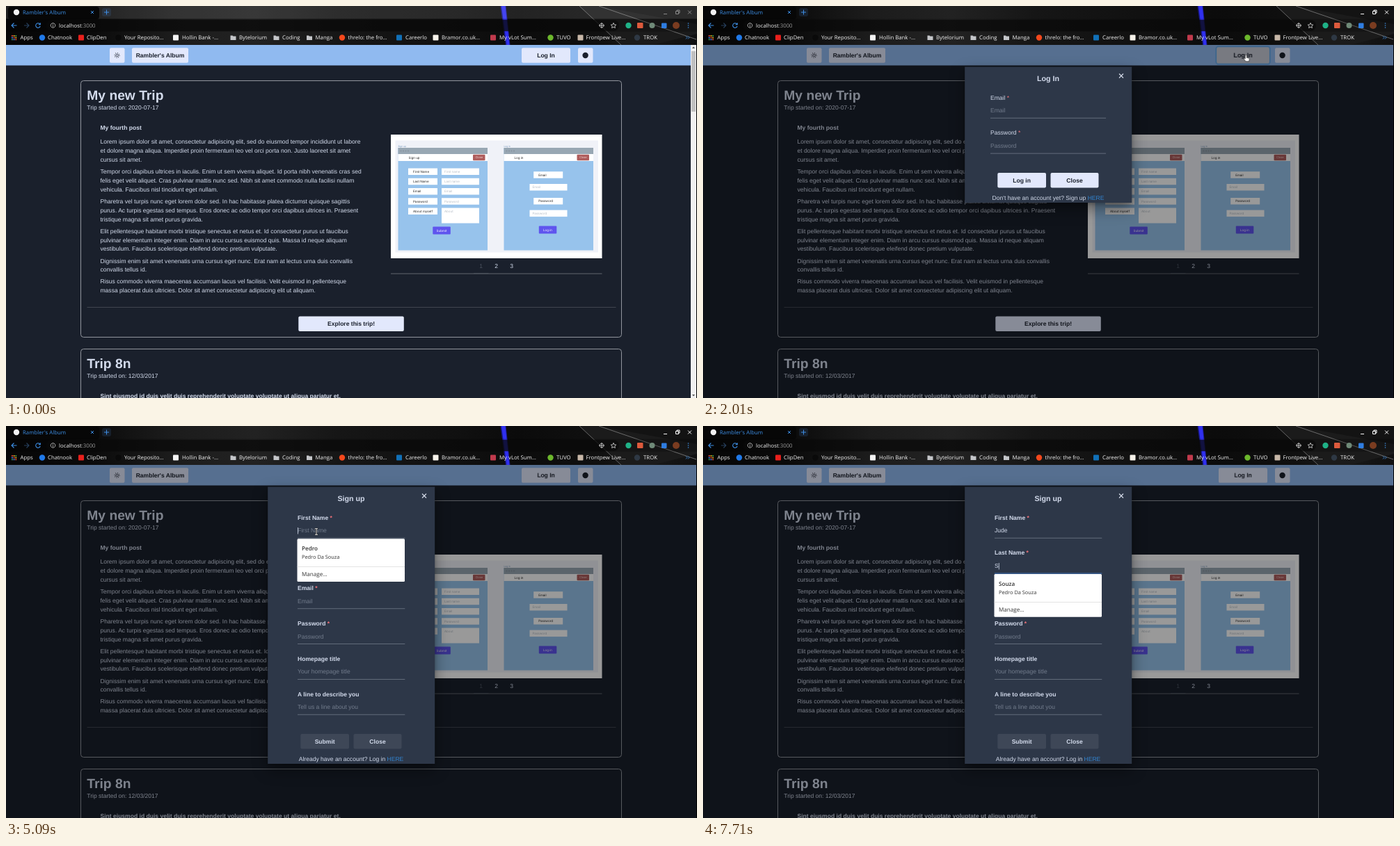
Animation of 993 by 564 pixels, one loop 8000 ms. Source, as an HTML page:

```html
<!DOCTYPE html>
<html lang="en">
<head>
<meta charset="utf-8">
<title>Rambler's Album</title>
<style>
html, body { margin: 0; width: 100%; height: 100%; overflow: hidden; background: #000; }
svg { display: block; width: 993px; height: 564px; }
text { font: 8.56px "Liberation Sans", Arial, sans-serif; fill: #d3dbec; text-rendering: geometricPrecision; white-space: pre; }
.b { font-weight: 700; }
.h1 { font-size: 19.26px; font-weight: 700; }
.h2 { font-size: 10.7px; font-weight: 700; }
.dark { font-weight: 700; fill: #1a202c; }
.mid { text-anchor: middle; }
.hint { fill: #727c8c; }
.red { fill: #f07178; }
.link { fill: #3182ce; }
.off { fill: #4c5361; }
.ui { font: 7.8px "Open Sans", "Noto Sans", sans-serif; fill: #f2f2f2; }
.tab { fill: #3d8fe6; }
.mock { font: 4.5px Inter, sans-serif; fill: #222; }
.pale { fill: #b4bcc6; }
.tiny { font-size: 3.2px; fill: #6b8fb5; }
.shut { font-size: 4px; fill: #f0d4d0; }
.white { fill: #fff; }
.pop { font: 8.1px "Open Sans", "Noto Sans", sans-serif; fill: #333; }
.popb { font-weight: 600; }
.small { font-size: 7.4px; }
.panel { filter: drop-shadow(0 2.7px 2.7px rgba(0,0,0,.2)) drop-shadow(0 8px 10.7px rgba(0,0,0,.4)); }

/* one loop is 8 s: 1% = 80 ms */
.a { animation: 8s step-end infinite; }
#idle { animation-name: idle; }
#awake { animation-name: awake; }
#vbar { animation-name: vbar; }
#hbar { animation-name: hbar; }
#shade { animation-name: shade; }
#login { animation-name: login; }
#signup { animation-name: signup; }
#xring { animation-name: xring; }
#btn { animation: btn 8s ease infinite; transform-origin: 776px 71px; }
#btnface { animation: face 8s linear infinite; }
#btnring { animation: ring 8s linear infinite; }
#line0 { animation: line0 8s linear infinite; }
#line1 { animation: line1 8s linear infinite; }
#hint0 { animation-name: hint0; }
#hint1 { animation-name: hint1; }
#k1 { animation-name: key1; }
#k2 { animation-name: key2; }
#k3 { animation-name: key3; }
#k4 { animation-name: key4; }
#s1, #pop1 { animation-name: last; }
#pop0 { animation-name: pop0; transform-origin: 496px 193px; }
#caret { animation-name: caret; }
#cursor { animation: path 8s linear infinite; }
#arrow { animation-name: arrow; }
#hand { animation-name: hand; }
#beam { animation-name: beam; }

@keyframes idle { 0% { opacity: 1 } 22.7%, 100% { opacity: 0 } }
@keyframes awake { 0% { opacity: .45 } 22.7%, 100% { opacity: 1 } }
@keyframes vbar { 0% { opacity: 1 } 25.1%, 100% { opacity: 0 } }
@keyframes hbar { 0% { opacity: 0 } 14.7% { opacity: 1 } 25.1%, 100% { opacity: 0 } }
@keyframes shade { 0% { opacity: 0 } 25.1%, 100% { opacity: 1 } }
@keyframes login { 0% { opacity: 0 } 25.1% { opacity: 1 } 43.3%, 100% { opacity: 0 } }
@keyframes signup { 0% { opacity: 0 } 43.3%, 100% { opacity: 1 } }
@keyframes xring { 0% { opacity: 0 } 26.2% { opacity: 1 } 41%, 100% { opacity: 0 } }
@keyframes btn { 0%, 13.6% { transform: scale(1) } 16.5%, 24.5% { transform: scale(1.1) } 28.5%, 100% { transform: scale(1) } }
@keyframes face { 0%, 13.6% { fill: #e2e8fc } 16.5%, 25.2% { fill: #c9ccd8 } 28.5%, 100% { fill: #e2e8fc } }
@keyframes ring { 0%, 22.6% { opacity: 0 } 23.5%, 25.2% { opacity: 1 } 28.5%, 100% { opacity: 0 } }
@keyframes line0 { 0%, 63.6% { fill: #707988 } 66.2%, 89.3% { fill: #4299e1 } 90.5%, 100% { fill: #707988 } }
@keyframes line1 { 0%, 89.3% { fill: #707988 } 91.5%, 100% { fill: #4280d8 } }
@keyframes hint0 { 0% { opacity: 1 } 78.4%, 100% { opacity: 0 } }
@keyframes hint1 { 0% { opacity: 1 } 96.3%, 100% { opacity: 0 } }
@keyframes last { 0% { opacity: 0 } 96.3%, 100% { opacity: 1 } }
@keyframes key1 { 0% { fill-opacity: 0 } 78.4%, 100% { fill-opacity: 1 } }
@keyframes key2 { 0% { fill-opacity: 0 } 80.8%, 100% { fill-opacity: 1 } }
@keyframes key3 { 0% { fill-opacity: 0 } 83.2%, 100% { fill-opacity: 1 } }
@keyframes key4 { 0% { fill-opacity: 0 } 85.3%, 100% { fill-opacity: 1 } }
@keyframes pop0 {
  0% { opacity: 0; transform: none }
  63.6% { opacity: 1; transform: none }
  78.4% { opacity: .75; transform: scale(.988) }
  79.6%, 100% { opacity: 0; transform: none }
}
@keyframes caret {
  0% { opacity: 0; transform: none }
  62.4% { opacity: 1; transform: none }
  71.1% { opacity: 0; transform: none }
  78.4% { opacity: 1; transform: translate(4.4px, 0) }
  80.8% { opacity: 1; transform: translate(9.2px, 0) }
  83.2% { opacity: 1; transform: translate(14px, 0) }
  85.3% { opacity: 1; transform: translate(18.8px, 0) }
  89.3% { opacity: 1; transform: translate(0, 51px) }
  96.3%, 100% { opacity: 1; transform: translate(5.8px, 51px) }
}
@keyframes path {
  0%, 2.8% { transform: translate(1010px, 325px) }
  2.9% { transform: translate(988px, 306px) }
  5.25% { transform: translate(948px, 208px) }
  7.6% { transform: translate(868px, 108px) }
  10% { transform: translate(799px, 58px) }
  12.4% { transform: translate(779.5px, 43px) }
  13.6% { transform: translate(780px, 58px) }
  16.2%, 26.2% { transform: translate(780.5px, 71px); animation-timing-function: ease-in-out }
  33.7% { transform: translate(578px, 267.5px) }
  35% { transform: translate(576px, 270px) }
  38.5%, 44.6% { transform: translate(571px, 279px) }
  52.7% { transform: translate(548px, 297px); animation-timing-function: ease-in-out }
  61.2%, 100% { transform: translate(446px, 152px) }
}
@keyframes arrow { 0% { opacity: 1 } 13.9% { opacity: 0 } 26.6% { opacity: 1 } 36% { opacity: 0 } 44.6% { opacity: 1 } 59.5%, 100% { opacity: 0 } }
@keyframes hand { 0% { opacity: 0 } 13.9% { opacity: 1 } 26.6% { opacity: 0 } 36% { opacity: 1 } 44.6%, 100% { opacity: 0 } }
@keyframes beam { 0% { opacity: 0 } 59.5% { opacity: 1 } 80.8%, 100% { opacity: 0 } }
</style>
</head>
<body>
<svg id="stage" viewBox="0 0 993 564" xmlns="http://www.w3.org/2000/svg"></svg>
<script>
const text = (x, y, s, cls = "", id = "") =>
  `<text x="${x}" y="${y}" class="${cls}"${id && ` id="${id}"`}>${s}</text>`;
const rect = (x, y, w, h, fill, more = "") =>
  `<rect x="${x}" y="${y}" width="${w}" height="${h}" fill="${fill}" ${more}/>`;
const dot = (x, y, r, fill) => `<circle cx="${x}" cy="${y}" r="${r}" fill="${fill}"/>`;
const path = (d, stroke, w = 1, fill = "none") =>
  `<path d="${d}" stroke="${stroke}" stroke-width="${w}" fill="${fill}"/>`;
const shape = (d, fill) => path(d, "none", 0, fill);
const group = (id, body, cls = "a") => `<g id="${id}" class="${cls}">${body}</g>`;

const PALE = "#e2e8fc", INK = "#1a202c", BLUE = "#3d8fe6";

// ---- browser frame ----
// kind: c = circle, s = square, f = folder
const marks = [
  [52, "c", "#2079e8", 60, "Chatnook"], [108, "s", "#e8201c", 116, "ClipDen"],
  [161.5, "c", "#0a0a0a", 170, "Your Reposito…"], [244, "s", "#f4f4f4", 253, "Hollin Bank -…"],
  [326.5, "f", "", 335, "Bytelorium"], [388.5, "f", "", 397, "Coding"], [436, "f", "", 444.5, "Manga"],
  [483, "c", "#f4481c", 491.5, "threlo: the fro…"], [565, "s", "#1170b8", 574, "Careerlo"],
  [617.5, "s", "#f6f2ea", 626, "Bramor.co.uk…"], [700, "s", "#c03a4c", 709, "My vLot Sum…"],
  [782.5, "c", "#6cb82c", 791, "TUVO"], [825.5, "s", "#c8b8a8", 833.5, "Frontpew Live…"],
  [907, "c", "#2e3844", 916, "TROK"]
];
const icon = (x, kind, fill) =>
  kind === "c" ? dot(x, 45.5, 4.2, fill) :
  kind === "s" ? rect(x - 4, 41.5, 8, 8, fill, 'rx="1"') :
  shape(`M${x - 4} 42.4h3l1 1.1h4v5.6h-8z`, "#c4c6c9");

function frame() {
  let s = `<defs><linearGradient id="metal">` +
    [[0, "#060606"], [.12, "#0a0a0a"], [.24, "#1c1c1c"], [.36, "#222"], [.48, "#161616"], [.66, "#101010"],
     [.74, "#0b0b0b"], [.86, "#101010"], [.92, "#1a1a1a"], [1, "#101010"]]
      .map(([o, c]) => `<stop offset="${o}" stop-color="${c}"/>`).join("") +
    `</linearGradient></defs>` + rect(0, 0, 993, 56, "url(#metal)") +
    shape("M824 0H993V40L930 56H885z", "#1b1b1b") + shape("M850 0H993V26z", "#131313") +
    path("M824 0L884 56M852 0L992 48", "#8d8d8d", .7) +
    shape("M710.500 0H718.500L724.500 56H718z", "#1a1a8c") + shape("M712 0H717.500L723.500 56H719.500z", "#3030f0");
  s += group("idle", rect(0, 0, 993, 18.5, "#fff", 'opacity=".1"'));
  s += rect(3, 1, 131, 18, "#070707", 'rx="4"') + rect(0, 18.5, 993, 18.5, "#000", 'opacity=".2"') +
    rect(58, 20, 823, 16, "#0a0a0a", 'rx="8" opacity=".7"');
  s += dot(15, 9, 4.2, "#f2f2f2") + text(24, 12, "Rambler's Album", "ui tab");
  s += path("M122 7l4 4M126 7l-4 4M144.500 5.500v7M141 9h7", BLUE) + rect(138, 3, 13, 12, "#4b8de0", 'rx="3" opacity=".14"');
  s += group("awake", path("M945 11.500h5M962.500 7.500h4v4h-4zM964 7.500v-1.500h4v4h-1.500M980 6.500l5 5M985 6.500l-5 5", "#fff"));
  s += path("M15.500 28h-7M11.500 24.500L8 28l3.500 3.500", BLUE, 1.1) +
    path("M26 28h7M29.500 24.500L33 28l-3.500 3.500", "#27405e", 1.1) +
    path("M48.600 26a3.300 3.300 0 1 0 .6 3M49.300 24.300v2.500h-2.500", BLUE, 1.1);
  s += path("M67.500 24.600a3.300 3.300 0 1 0 .01 0M67.500 27.500v2.300M67.500 25.900v.9", "#d8d8d8", .8) +
    text(76, 30.8, 'localhost<tspan fill="#9a9a9a">:3000</tspan>', "ui");
  s += path("M856 25a3 3 0 1 0 .01 0M852 28h8M856 24v8", "#ddd", .8) +
    path("M873 24.300l1.100 2.500 2.700.3-2 1.800.6 2.700-2.400-1.400-2.400 1.400.6-2.700-2-1.800 2.700-.3z", "#ddd", .8);
  s += dot(894.5, 28, 4.2, "#1fb287") + rect(907, 24, 8.5, 8, "#dc5a3c", 'rx="1"') + dot(928.5, 28, 4, "#6f8a78") +
    rect(942, 24.5, 7.5, 7.5, "#2f7de0", 'rx="1"') + dot(963, 28, 5, "#7a3c20");
  s += [25, 28, 31].map(y => dot(980.5, y, .8, BLUE)).join("");
  for (let i = 0; i < 9; i++)
    s += rect(8 + i % 3 * 2.7, 42 + (i / 3 | 0) * 2.7, 1.8, 1.8, ["#ea4b3c", "#f2b51d", "#3c9e58", "#4285f4"][i % 4]);
  s += text(20.5, 48.2, "Apps", "ui");
  for (const [x, kind, fill, tx, label] of marks) s += icon(x, kind, fill) + text(tx, 48.2, label, "ui");
  return s + path("M977 43.500l2 2-2 2M980 43.500l2 2-2 2", BLUE, .9);
}

// ---- page ----
const paras = [
  ["Lorem ipsum dolor sit amet, consectetur adipiscing elit, sed do eiusmod tempor incididunt ut labore",
   "et dolore magna aliqua. Imperdiet proin fermentum leo vel orci porta non. Justo laoreet sit amet", "cursus sit amet."],
  ["Tempor orci dapibus ultrices in iaculis. Enim ut sem viverra aliquet. Id porta nibh venenatis cras sed",
   "felis eget velit aliquet. Cras pulvinar mattis nunc sed. Nibh sit amet commodo nulla facilisi nullam",
   "vehicula. Faucibus nisl tincidunt eget nullam."],
  ["Pharetra vel turpis nunc eget lorem dolor sed. In hac habitasse platea dictumst quisque sagittis",
   "purus. Ac turpis egestas sed tempus. Eros donec ac odio tempor orci dapibus ultrices in. Praesent",
   "tristique magna sit amet purus gravida."],
  ["Elit pellentesque habitant morbi tristique senectus et netus et. Id consectetur purus ut faucibus",
   "pulvinar elementum integer enim. Diam in arcu cursus euismod quis. Massa id neque aliquam",
   "vestibulum. Faucibus scelerisque eleifend donec pretium vulputate."],
  ["Dignissim enim sit amet venenatis urna cursus eget nunc. Erat nam at lectus urna duis convallis", "convallis tellus id."],
  ["Risus commodo viverra maecenas accumsan lacus vel facilisis. Velit euismod in pellentesque",
   "massa placerat duis ultricies. Dolor sit amet consectetur adipiscing elit ut aliquam."]
];

const card = (y, h, title, date) =>
  rect(107.5, y, 777, h, "none", 'rx="4" stroke="#92969e"') +
  text(116.3, y + 27, title, "h1") + text(116.3, y + 41.5, "Trip started on: " + date);

const win = (x, title, shut) =>
  text(x, 203, title, "mock tiny") +
  rect(x, 204, 128.5, 147.5, "#97c3ec") + rect(x, 204, 128.5, 9, "#98a7b3") + rect(x, 213, 128.5, 10, "#fff") +
  [4, 7.5, 11, 14.5].map(d => dot(x + d, 208.5, 1, "#87949f")).join("") +
  text(x + 15, 219.7, title, "mock") + rect(shut, 213.7, 17.5, 8.6, "#ae5c5c", 'rx="1"') +
  text(shut + 8.8, 219.4, "Close", "mock mid shut");
const tag = (x, y, s) => rect(x, y, 42, 9.5, "#fff") + text(x + 7, y + 6.3, s, "mock");
const box = (x, y, s, h = 9.5) => rect(x, y, 54, h, "#fff") + text(x + 4, y + 6.4, s, "mock pale");
const go = (x, y, s) => rect(x, y, 25.5, 10.8, "#5f54ee", 'rx="1"') + text(x + 12.7, y + 7, s, "mock mid white");

function picture() {
  let s = rect(553, 185, 303.5, 178, "#fff") + rect(559.5, 193.5, 291.5, 161, "#f0f2f8") +
    win(563.5, "Sign up", 671) + win(715.5, "Log in", 820.5);
  [["First Name", "First name"], ["Last Name", "Last name"], ["Email", "Email"], ["Password", "Password"], ["About myself", "About"]]
    .forEach(([a, b], i) => { s += tag(578, 233.5 + i * 14.25, a) + box(626, 233.5 + i * 14.25, b, i < 4 ? 9.5 : 22); });
  return s + go(613.3, 317.6, "Submit") + tag(758.2, 238.2, "Email") + box(752.5, 256, "Email") +
    tag(758.2, 276, "Password") + box(752.5, 293.6, "Password") + go(765.8, 316.6, "Log in");
}

const button = (x, y, w, label, fill = PALE, cls = "dark") =>
  rect(x, y, w, 21.5, fill, 'rx="2"') + text(x + w / 2, y + 13.7, label, cls + " mid");

function page() {
  let s = rect(0, 55.5, 992, 508.5, INK) + rect(0, 55.5, 992, 30, "#90baf0");
  s += button(149, 60.2, 21.5, "") + `<circle cx="159.600" cy="71" r="1.700" fill="none" stroke="${INK}" stroke-width=".8"/>` +
    `<circle cx="159.600" cy="71" r="3.400" fill="none" stroke="${INK}" stroke-width="1.200" stroke-dasharray=".8 1.870"/>`;
  s += button(181, 60.2, 81, "Rambler's Album") + button(822, 60.2, 21.5, "") + dot(832.6, 71, 4.2, INK);
  s += group("btn", rect(740.2, 59.2, 71.6, 23.5, "none", 'id="btnring" rx="3" stroke="#4299e1" stroke-opacity=".6" stroke-width="1.600"') +
    rect(741, 60.2, 70, 21.5, PALE, 'id="btnface" rx="2"') + text(776, 74, "Log In", "dark mid"), "");
  s += card(107.5, 369, "My new Trip", "2020-07-17") + text(135.5, 178, "My fourth post", "b");
  let y = 198.3;
  for (const lines of paras) {
    for (const line of lines) { s += text(135.5, y, line); y += 12.84; }
    y += 4.28;
  }
  s += picture() + text(682.7, 376.6, "1", "mid off") + text(704.6, 376.6, "2", "mid") + text(726.6, 376.6, "3", "mid");
  s += rect(553, 384.6, 303.5, 1, "#62676f") + rect(672, 384.1, 21.5, 1, "#454c58");
  s += rect(116.5, 433, 760, 1, "#40454f") + button(420.3, 446.6, 151.5, "Explore this trip!");
  return s + card(493.5, 120, "Trip 8n", "12/03/2017") +
    text(135.5, 563.8, "Sint eiusmod id duis velit duis reprehenderit voluptate voluptate ut aliqua pariatur et.", "b");
}

const vbar = (bottom, thumb) => rect(984, 55.5, 8, bottom - 55.5, "#f1f1f1") + rect(985, 65, 6, thumb, "#c1c1c1") +
  shape(`M986 61l2-2.500 2 2.500zM986 ${bottom - 5}l2 2.500 2-2.500z`, "#505050");
const hbar = () => rect(0, 556, 992, 8, "#f1f1f1") + rect(984, 556, 8, 8, "#dcdcdc") + rect(8, 557, 960, 6, "#c1c1c1") +
  shape("M5 558l-2.500 2 2.500 2zM979 558l2.500 2-2.500 2z", "#505050") + vbar(556, 85);

// ---- dialogs ----
const panel = (h, title) => rect(376.2, 87.5, 240, h, "#2d3748", 'class="panel"') +
  text(496, 108.3, title, "h2 mid") + path("M598 97.500l6 6M604 97.500l-6 6", "#d8deec", 1.1);
const field = (x, w, y, label, hint, cls, i, need) =>
  text(x, y, label + (need ? ' <tspan class="red">*</tspan>' : ""), cls) +
  text(x, y + 18.7, hint, "hint a", i < 0 ? "" : "hint" + i) +
  rect(x, y + 26.3, w, .8, "#707988", i < 0 ? "" : `id="line${i}"`);
const foot = (y, s) => text(496, y, s + ' <tspan class="link">HERE</tspan>', "mid");

const login = () => panel(195.5, "Log In") +
  rect(591.8, 91.2, 18.6, 18.6, "none", 'id="xring" class="a" rx="2.500" stroke="#4299e1" stroke-opacity=".6" stroke-width="1.600"') +
  field(413, 166, 134.5, "Email", "Email", "", -1, true) + field(413, 166, 185.4, "Password", "Password", "", -1, true) +
  button(423.3, 240, 69.7, "Log in") + button(499.5, 240, 69, "Close") +
  foot(279.2, "Don't have an account yet? Sign up");

const popup = (y, name) => rect(418.5, y, 154.5, 61.7, "#fff", 'rx="1.500"') +
  text(425, y + 16.6, name, "pop popb") + text(425, y + 29, "Pedro Da Souza", "pop small") +
  rect(418.5, y + 40, 154.5, .8, "#dcdcdc") + text(425, y + 54.2, "Manage…", "pop");

function signup() {
  let s = panel(398.5, "Sign up");
  [["First Name", "First Name"], ["Last Name", "Last Name"], ["Email", "Email"], ["Password", "Password"],
   ["Homepage title", "Your homepage title"], ["A line to describe you", "Tell us a line about you"]]
    .forEach(([a, b], i) => { s += field(419, 154.3, 134.5 + i * 50.8, a, b, "b", i < 2 ? i : -1, i < 4); });
  s += button(423.3, 443, 69.7, "Submit", "#3e4757", "b") + button(499.5, 443, 69, "Close", "#3e4757", "b") +
    foot(482.2, "Already have an account? Log in");
  s += text(419, 153.2, [..."Jude"].map((c, i) => `<tspan id="k${i + 1}" class="a">${c}</tspan>`).join("")) +
    text(419, 204.1, "S", "a", "s1") + rect(419.2, 146, .8, 9.5, "#d3dbec", 'id="caret" class="a"');
  return s + group("pop0", popup(162.2, "Pedro")) + group("pop1", popup(213, "Souza"));
}

const pointer = () =>
  group("arrow", path("M0 0V9.500L2.200 7.500 3.700 10.800 5.200 10.100 3.700 7H6.700z", "#fff", .6, "#111")) +
  group("hand", path("M-1.200.6a1.100 1.100 0 0 1 2.200 0V3.300l2.600.7q1.200.4 1.100 1.600l-.6 3.200h-4.800l-2.300-3.400q-.6-1.100.5-1.300l1.300.8z", "#111", .6, "#fff")) +
  group("beam", path("M-2.200-4.300H2.200M0-4.300V4.300M-2.200 4.300H2.200", "#111", 2) + path("M-2-4.300H2M0-4.300V4.300M-2 4.300H2", "#fff", .9));

document.getElementById("stage").innerHTML =
  page() + group("vbar", vbar(564, 87)) + group("hbar", hbar()) +
  group("shade", rect(0, 55.5, 992, 508.5, "#000", 'opacity=".4"')) +
  frame() + group("login", login()) + group("signup", signup()) +
  rect(992, 55.5, 1, 509, "#000") + group("cursor", pointer(), "");
</script>
</body>
</html>
```
